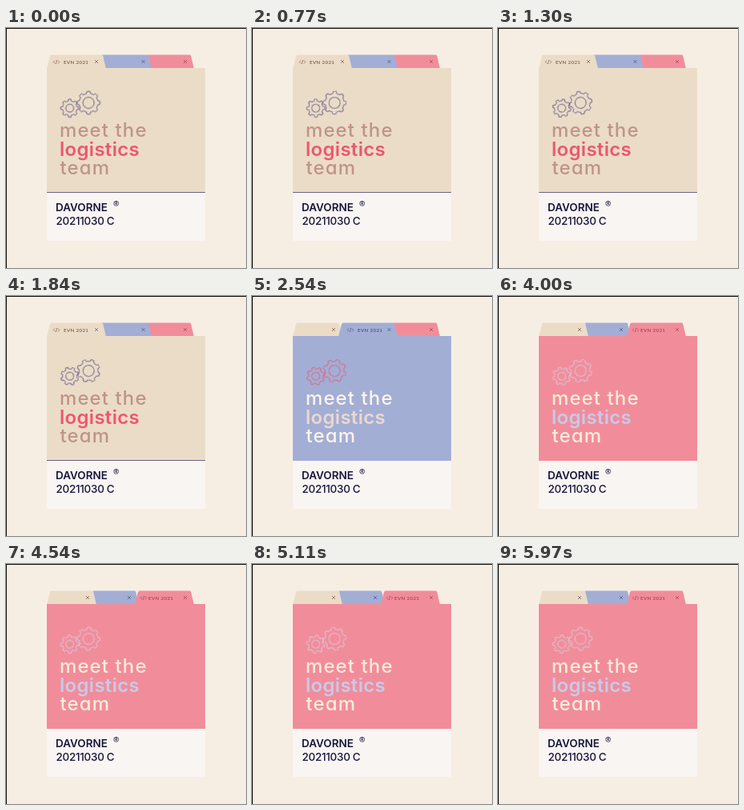
Animation of 300x300 px, one loop 6000 ms. Source, as an HTML page:

```html
<!DOCTYPE html>
<html lang="en">
<head>
<meta charset="utf-8">
<title>Meet the team</title>
<style>
html, body { margin: 0; width: 100%; height: 100%; overflow: hidden; background: #f7eee3; }
svg { display: block; width: 100vw; height: 100vh; font-family: Inter, Lato, sans-serif; font-optical-sizing: none; }
.face { opacity: 0; animation: show 6s step-end infinite; }
.gear { fill: none; stroke-width: .9; stroke-linejoin: round; animation: turn 6s linear infinite; }
.gear.back { animation-direction: reverse; }
.head { font-size: 24px; font-weight: 500; letter-spacing: 1.1px; font-feature-settings: "cv11"; }
.accent { font-weight: 600; letter-spacing: .3px; }
.tag { font: 700 6.2px Lato, sans-serif; letter-spacing: .35px; }
.icon { fill: none; stroke-width: .8; }
.foot { fill: #17153d; font-size: 13.5px; }
@keyframes show { 0% { opacity: 1; } 33.333%, 100% { opacity: 0; } }
@keyframes turn { to { transform: rotate(360deg); } }
</style>
</head>
<body>
<svg viewBox="0 0 300 300">
  <rect width="300" height="300" fill="#f7eee3"/>
  <path d="M51 206H249V264.500Q249 266 247.500 266H52.500Q51 266 51 264.500Z" fill="#f9f5f3"/>
  <g id="faces"></g>
  <g class="foot">
    <text x="62" y="229" font-weight="600">DAVORNE</text>
    <text x="62.500" y="246" font-weight="500" letter-spacing="-.3">20211030 C</text>
    <circle cx="137.700" cy="219.300" r="3" fill="none" stroke="#17153d" stroke-width=".7"/>
    <text x="137.700" y="221" font-size="4.500" font-weight="700" text-anchor="middle">R</text>
  </g>
  <path d="M0 .5H300M.5 0V300" stroke="#100f0f"/>
</svg>
<script>
const fills = ['#ebdcc8', '#a3aed5', '#f18d9b'];
const inks = ['#8c675f', '#555a92', '#b8435c'];

// edges: [left, right] of each tab; tag: left end of the label
const themes = [
  { gear: '#56507c', text: '#bf9585', accent: '#ee5670', rule: '#6f6480', tag: 59, edges: [[51, 125], [114, 182], [172, 235]], marks: [113, 171.5, 224] },
  { gear: '#e8566f', text: '#fdf4ea', accent: '#ebd8cc', tag: 119, edges: [[51, 113], [108, 182], [172, 235]], marks: [102, 171.5, 224] },
  { gear: '#d9cfe2', text: '#fdecd9', accent: '#c7cae9', tag: 168, edges: [[51, 113], [104, 166], [161, 235]], marks: [102, 154, 224] }
];

function gearPath(teeth, outer, root) {
  const step = 2 * Math.PI / teeth;
  const point = (r, a) => (r * Math.cos(a)).toFixed(2) + ' ' + (r * Math.sin(a)).toFixed(2);
  let d = '';
  for (let i = 0; i < teeth; i++) {
    const a = i * step;
    d += (i ? 'L' : 'M') + point(root, a - step * .28) + 'L' + point(outer, a - step * .17)
      + `A${outer} ${outer} 0 0 1 ` + point(outer, a + step * .17)
      + 'L' + point(root, a + step * .28)
      + `A${root} ${root} 0 0 1 ` + point(root, a + step * .72);
  }
  return d + 'Z';
}

const gear = (x, y, outer, root, hole, turn) =>
  `<g transform="translate(${x} ${y})"><g class="gear ${turn}">
    <path d="${gearPath(8, outer, root)}"/><circle r="${hole}"/></g></g>`;

function tab(theme, i) {
  const [l, r] = theme.edges[i], x = theme.marks[i];
  return `<path fill="${fills[i]}" d="M${l} 51L${l + 4} 35Q${l + 4.5} 33.500 ${l + 6} 33.500H${r - 5}Q${r - 4} 33.500 ${r - 3.7} 35L${r} 51Z"/>
    <path class="icon" stroke="${inks[i]}" d="M${x - 2} 40l4 4m0-4l-4 4"/>`;
}

function face(theme, i) {
  const order = [2, 1, 0].filter(n => n !== i).concat(i);
  const x = theme.tag;
  return `<g class="face" style="animation-delay:${(i * 2 - .01 - (i ? 6 : 0)).toFixed(2)}s">
    ${order.map(n => tab(theme, n)).join('')}
    <path d="M51 50H249V206H51Z" fill="${fills[i]}"/>
    ${theme.rule ? `<path d="M51 205.500H249" stroke="${theme.rule}"/>` : ''}
    <path class="icon" stroke="${inks[i]}" d="M${x + 2.2} 40.500l-2 2l2 2m2.500-4.500l-1.400 5m2.500-4.500l2 2l-2 2"/>
    <text class="tag" x="${x + (i === 2 ? 10 : 13)}" y="44.500" fill="${inks[i]}">EVN 2021</text>
    <g stroke="${theme.gear}">
      ${gear(103.2, 93.5, 14.3, 11.8, 7, '')}
      ${gear(79.7, 100.2, 11.3, 9, 5, 'back')}
    </g>
    <g class="head" fill="${theme.text}">
      <text x="67" y="135.800">meet the</text>
      <text class="accent" x="67" y="159.500" fill="${theme.accent}">logistics</text>
      <text x="67.500" y="183">team</text>
    </g>
  </g>`;
}

document.getElementById('faces').innerHTML = themes.map(face).join('');
</script>
</body>
</html>
```
